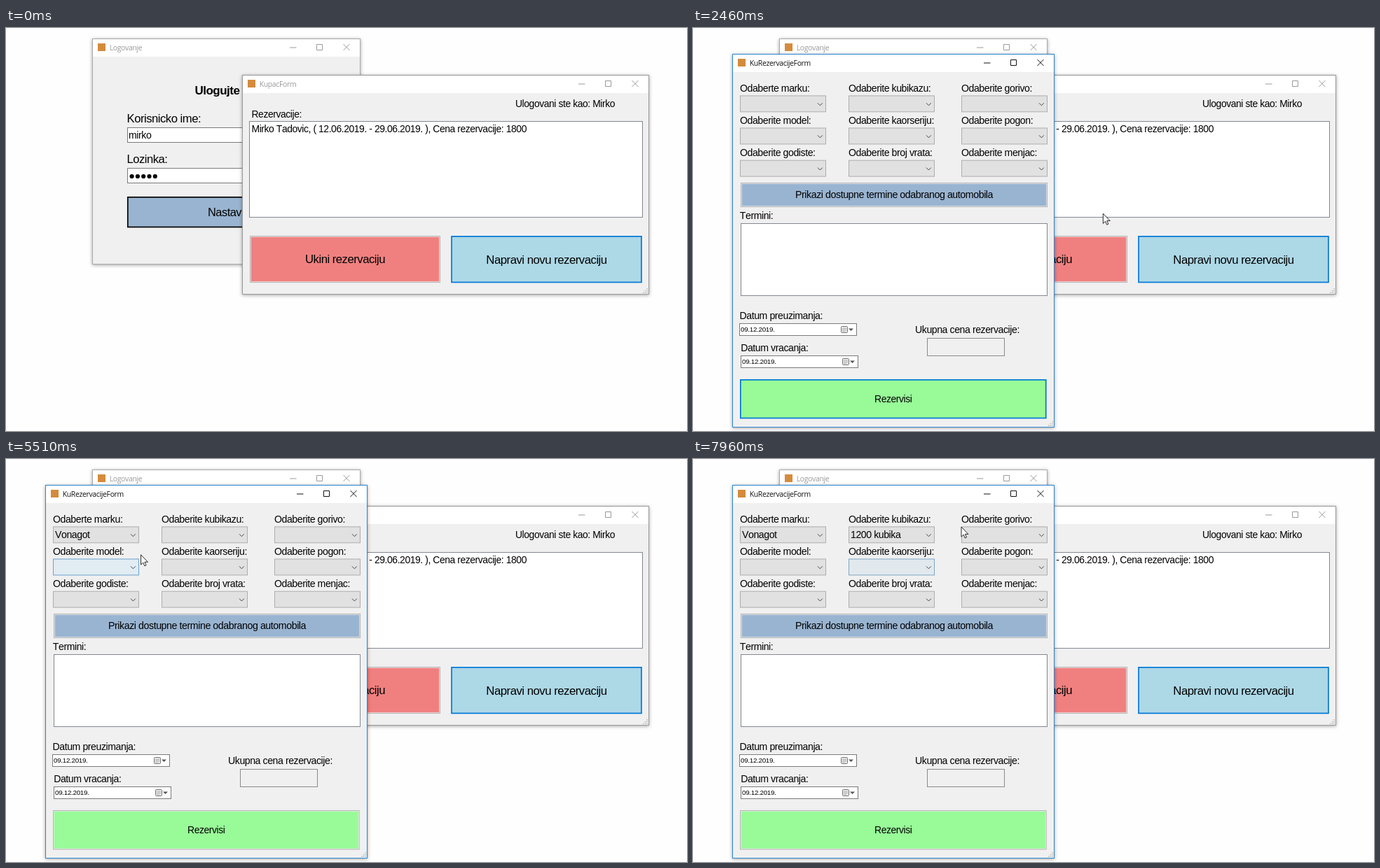
Recreate the animation shown at these times as an HTML page. Size 972 by 576 pixels, loop 7.99 s.

```html
<!DOCTYPE html>
<html lang="sr">
<head>
<meta charset="utf-8">
<title>Rezervacije</title>
<style>
html, body { margin: 0; width: 100%; height: 100%; overflow: hidden; background: #fefefe; }
svg { display: block; }
#stage { position: absolute; left: 0; top: 0; }
text { font-family: "Liberation Sans", Arial, sans-serif; font-kerning: none; letter-spacing: -.03em; white-space: pre; }
.cap { font-family: "Open Sans", "Noto Sans", sans-serif; }
.frame { filter: drop-shadow(0 1px 2.5px rgba(0, 0, 0, .36)); }
</style>
</head>
<body>
<svg id="stage" width="972" height="576" viewBox="0 0 972 576"></svg>
<script>
const LOOP = 7990, BLUE = '#0078d7', GREY = '#adadad', FACE = '#f0f0f0', ROW = 16.78;
const OPEN = { start: 1990, end: 2210 };
const stage = document.getElementById('stage');
const $ = id => document.getElementById(id);

// ---- drawing helpers ----
const rect = (x, y, w, h, fill, attr = '') =>
  `<rect x="${x}" y="${y}" width="${w}" height="${h}" fill="${fill}" ${attr}/>`;
const box = (x, y, w, h, fill, stroke, attr = '') =>
  rect(x + .5, y + .5, w - 1, h - 1, fill, `stroke="${stroke}" ${attr}`);
const text = (x, y, str, size = 14.1, attr = '') =>
  `<text x="${x}" y="${y}" font-size="${size}" ${attr}>${str}</text>`;
const line = (d, color, width = 1) =>
  `<path d="${d}" fill="none" stroke="${color}" stroke-width="${width}"/>`;

function win(x, y, w, h, title, ink, border, grip, inner) {
  const cy = y + 12.5, r = x + w;
  let s = box(x, y, w, h, FACE, border, 'class="frame"')
    + rect(x + 1, y + 1, w - 2, 25, '#fff')
    + rect(x + 8, y + 7, 11, 11, '#d58b3c')
    + text(x + 24.7, y + 16.7, title, 10.4, `class="cap" fill="${ink}"`)
    + line(`M${r - 101} ${cy + .5}h9.5`, ink)
    + line(`M${r - 62.5} ${cy - 4}h8v8h-8z`, ink)
    + line(`M${r - 24.5} ${cy - 4.5}l9 9m0-9l-9 9`, ink);
  if (grip) for (let i = 0; i < 3; i++) for (let j = 0; j <= i; j++)
    s += rect(r - 9 + i * 2.7, y + h - 3.5 - j * 2.7, 1.5, 1.5, '#b8b8b8');
  return s + inner;
}

const button = (id, x, y, w, h, fill, label, size) =>
  `<g id="${id}">` + rect(x, y, w, h, GREY)
  + rect(x + .9, y + .9, w - 1.8, h - 1.8, FACE)
  + rect(x + 1.7, y + 1.7, w - 3.4, h - 3.4, fill)
  + text(x + w / 2, y + h / 2 + size * .35, label, size, 'text-anchor="middle"') + '</g>';

function skin(id, border, gap) {
  const [outer, mid] = $(id).children;
  outer.setAttribute('fill', border);
  mid.setAttribute('fill', gap);
}

const datePick = (x, y) => box(x, y, 168, 18, '#fff', '#7a7a7a')
  + text(x + 2, y + 12.4, '09.12.2019.', 9.8)
  + box(x + 145, y + 4, 10, 10, '#e4e4e4', '#777', 'rx="1"')
  + line(`M${x + 147} ${y + 7.5}h6m-6 2h6m-6 2h4`, '#aaa', .8)
  + `<path d="M${x + 156} ${y + 7.5}h7l-3.5 3.5z" fill="#555"/>`;

// ---- content ----
const COLS = [67, 222, 383], ROWS = [96.4, 142.5, 188.7], CW = 123, CH = 23.9;
const LABELS = [
  ['Odaberte marku:', 'Odaberite kubikazu:', 'Odaberite gorivo:'],
  ['Odaberite model:', 'Odaberite kaorseriju:', 'Odaberite pogon:'],
  ['Odaberite godiste:', 'Odaberite broj vrata:', 'Odaberite menjac:']
];
const MAKES = ('Siru,Nodanil,Vonagot,Dulma,Corvaën,Orul,Orva Tileno,Švena,Brunvaret,Tarsehn,Yonta,'
  + 'Kizaro,Vezna,Kitsurashi,Zevus,Kayoma,WRQ,Feldstragen,Zakuni,Lorvedes-Hant,Ruuv,Elvi,Uvi,'
  + 'Veld Hikar,Dralk,Krelvson,Vold').split(',');
const SIZES = [800, 1000, 1200, 1300, 1400, 1500, 1600, 1700, 1900, 2000, 2200, 2500, 3000, 3500]
  .map(n => n + ' kubika');

const combos = [];
ROWS.forEach((y, r) => COLS.forEach((x, c) => combos.push({ x, y, id: 'combo' + r + c, label: LABELS[r][c] })));

const lists = [
  { id: 'makes', combo: combos[0], items: MAKES, pick: 2, h: 503, press: 3560, open: 3600, span: 200, close: 5250, rowW: 106.5, bar: true },
  { id: 'sizes', combo: combos[1], items: SIZES, pick: 2, h: 236, press: 5975, open: 5990, span: 147, close: 7300, rowW: 121 }
];

const comboMarkup = ({ x, y, id, label }) => text(x, y - 5.7, label)
  + `<g id="${id}">` + box(x, y, CW, CH, '#e1e1e1', GREY)
  + line(`M${x + 111} ${y + 10.9}l3.4 3.4l3.4-3.4`, '#444')
  + text(x + 3, y + 16.7, '') + '</g>';

function listMarkup({ id, combo, items, h, rowW, bar }) {
  const x = combo.x, y = 121;
  let s = `<g id="${id}">` + rect(x + 5, y + 4, CW - 3.5, h - 2.5, '#000', 'opacity=".5"')
    + rect(x, y, CW, h, '#fff')
    + `<svg x="${x}" y="${y}" width="${CW}" height="${h}">`
    + rect(0, 0, CW, h, '#fff') + rect(1, 0, rowW, ROW, BLUE);
  items.forEach((name, i) => s += text(2.8, 13.3 + i * ROW, name));
  if (bar) s += rect(108, 0, 14, h, FACE) + rect(109, 14, 12, 365, '#cdcdcd')
    + line('M111.5 10l3.2-3.5l3.2 3.5', '#555', 1.3);
  return s + line(`M.5 0v${h - .5}h${CW - 1}v${.5 - h}`, BLUE) + '</svg></g>';
}

const login = win(123, 15, 383, 323, 'Logovanje', '#999', '#aaa', false,
  text(269.5, 95, 'Ulogujte se', 17, 'font-weight="bold"')
  + text(172.5, 135, 'Korisnicko ime:', 16.7) + box(173, 142, 283, 22, '#fff', '#7a7a7a')
  + text(175, 158, 'mirko', 14.1)
  + text(172.5, 193.3, 'Lozinka:', 16.6) + box(173, 200, 283, 22, '#fff', '#7a7a7a')
  + [0, 1, 2, 3, 4].map(i => `<circle cx="${179.6 + i * 8.3}" cy="212" r="3.1"/>`).join('')
  + rect(173.8, 241.8, 281, 42.7, '#99b4d1', 'stroke="#000" stroke-width="1.7"')
  + text(288, 268.7, 'Nastavi', 16.4));

const buyer = win(337, 67, 581, 314, 'KupacForm', '#999', '#999', true,
  text(727, 113.2, 'Ulogovani ste kao: Mirko', 13.9) + text(350.5, 127.6, 'Rezervacije:', 13.9)
  + box(347, 133, 562, 138, '#fff', '#828790')
  + text(350.5, 148.6, 'Mirko Tadovic, ( 12.06.2019. - 29.06.2019. ), Cena rezervacije: 1800', 13.9)
  + button('cancel', 348, 297, 272, 67, '#f08080', 'Ukini rezervaciju', 16.7)
  + button('create', 635.2, 297, 272.6, 67.3, '#add8e6', 'Napravi novu rezervaciju', 16.75));

const booking = win(56, 37, 460, 534, 'KuRezervacijeForm', '#111', '#2b86d1', true,
  combos.map(comboMarkup).join('')
  + button('show', 68, 221, 438, 35, '#99b4d1', 'Prikazi dostupne termine odabranog automobila', 14.2)
  + text(66.8, 273, 'Termini:') + box(68, 279, 438, 104, '#fff', '#828790')
  + text(66.5, 416.2, 'Datum preuzimanja:') + datePick(66, 422)
  + text(68.2, 462.4, 'Datum vracanja:') + datePick(68, 468)
  + text(317, 435.7, 'Ukupna cena rezervacije:') + box(334, 443, 111, 26, FACE, '#8a8a8a')
  + button('book', 67, 502, 437.6, 56.4, '#98fb98', 'Rezervisi', 13.9));

stage.innerHTML = rect(0, 0, 972, 576, '#fefefe') + login + buyer
  + `<g id="booking">${booking}</g>` + lists.map(listMarkup).join('')
  + '<path id="cursor" d="M0 0V14.2L3.2 11.2L5.3 16L7.5 15L5.4 10.4H9.9Z" fill="#fff" stroke="#111" stroke-width=".9"/>';

// ---- motion ----
// cursor stops: time, x, y
const PATH = [
  [59, 780, 600], [60, 772, 543], [200, 738, 380], [330, 715, 230], [470, 706, 153],
  [670, 706, 153], [1000, 712, 185], [1250, 738, 260], [1400, 752.5, 334],
  [2370, 752.5, 334], [2600, 330, 160], [2750, 352, 175], [2900, 430, 200], [2980, 384, 185], [3070, 365, 113],
  [3170, 365, 113], [3220, 340, 95], [3320, 240, 91], [3400, 182.5, 101.5],
  [3640, 182.5, 101.5], [3950, 150, 127], [4050, 150, 127], [4310, 140, 145.5],
  [4980, 140, 145.5], [5120, 132, 160], [5300, 132, 160], [5760, 264, 109.5],
  [6200, 264, 109.5], [6560, 285, 141], [6790, 285, 141], [7030, 285, 160],
  [7400, 285, 160], [7750, 318, 146], [7960, 383, 97]
];

function cursorAt(t) {
  const i = PATH.findIndex(p => p[0] > t);
  if (i === 0) return PATH[0].slice(1);
  if (i < 0) return PATH[PATH.length - 1].slice(1);
  const a = PATH[i - 1], b = PATH[i], u = (t - a[0]) / (b[0] - a[0]);
  return [a[1] + (b[1] - a[1]) * u, a[2] + (b[2] - a[2]) * u];
}

const inside = ([px, py], x, y, w, h) => px > x && px < x + w && py > y && py < y + h;
const mix = (a, b, u) => 'rgb(' + a.map((v, i) => Math.round(v + (b[i] - v) * u)) + ')';
const show = (el, on) => el.setAttribute('visibility', on ? 'visible' : 'hidden');

// hover glow fades over 600 ms after the pointer leaves
function glow(c, t) {
  for (let k = 0; k < 24; k++)
    if (inside(cursorAt(t - k * 25), c.x + .5, c.y + 1, CW, CH)) return 1 - k / 24;
  return 0;
}

function draw(t) {
  const pos = cursorAt(t);
  $('cursor').setAttribute('transform', `translate(${pos})`);
  show($('cursor'), t >= 60);

  const hot = t < 1900 && inside(pos, 635, 297, 273, 67);
  skin('create', BLUE, hot ? '#e5f1fb' : BLUE);

  const u = Math.min(1, Math.max(0, (t - OPEN.start) / (OPEN.end - OPEN.start)));
  const p = 1 - (1 - u) ** 2.4, s = .955 + .045 * p;
  $('booking').setAttribute('opacity', p);
  $('booking').setAttribute('transform', `translate(286 304) scale(${s}) translate(-286 -304)`);

  const plain = t >= lists[0].press;
  skin('book', plain ? GREY : BLUE, plain ? FACE : BLUE);

  for (const c of combos) {
    const own = lists.find(l => l.combo === c);
    const pressed = own && t >= own.press && t < own.close;
    const g = glow(c, t), [face, , label] = $(c.id).children;
    face.setAttribute('fill', pressed ? '#cce4f7' : mix([225, 225, 225], [225, 237, 246], g));
    face.setAttribute('stroke', pressed ? BLUE : mix([173, 173, 173], [100, 160, 208], g));
    label.textContent = own && t >= own.close ? own.items[own.pick] : '';
  }

  for (const l of lists) {
    const el = $(l.id), on = t >= l.open && t < l.close;
    show(el, on);
    const [, back, view] = el.children, row = Math.floor((pos[1] - 121) / ROW);
    const h = l.h * Math.min(1, Math.max(0, (t - l.open) / l.span));
    view.setAttribute('height', Math.max(.01, h));
    const mark = view.children[1];
    mark.setAttribute('y', Math.max(0, row) * ROW);
    show(mark, on && row >= 0);
    [...view.querySelectorAll('text')].forEach((n, i) => n.setAttribute('fill', i === row ? '#fff' : '#000'));
  }
}

const begin = performance.now();
function tick() {
  draw((performance.now() - begin) % LOOP);
  requestAnimationFrame(tick);
}
tick();
</script>
</body>
</html>
```
